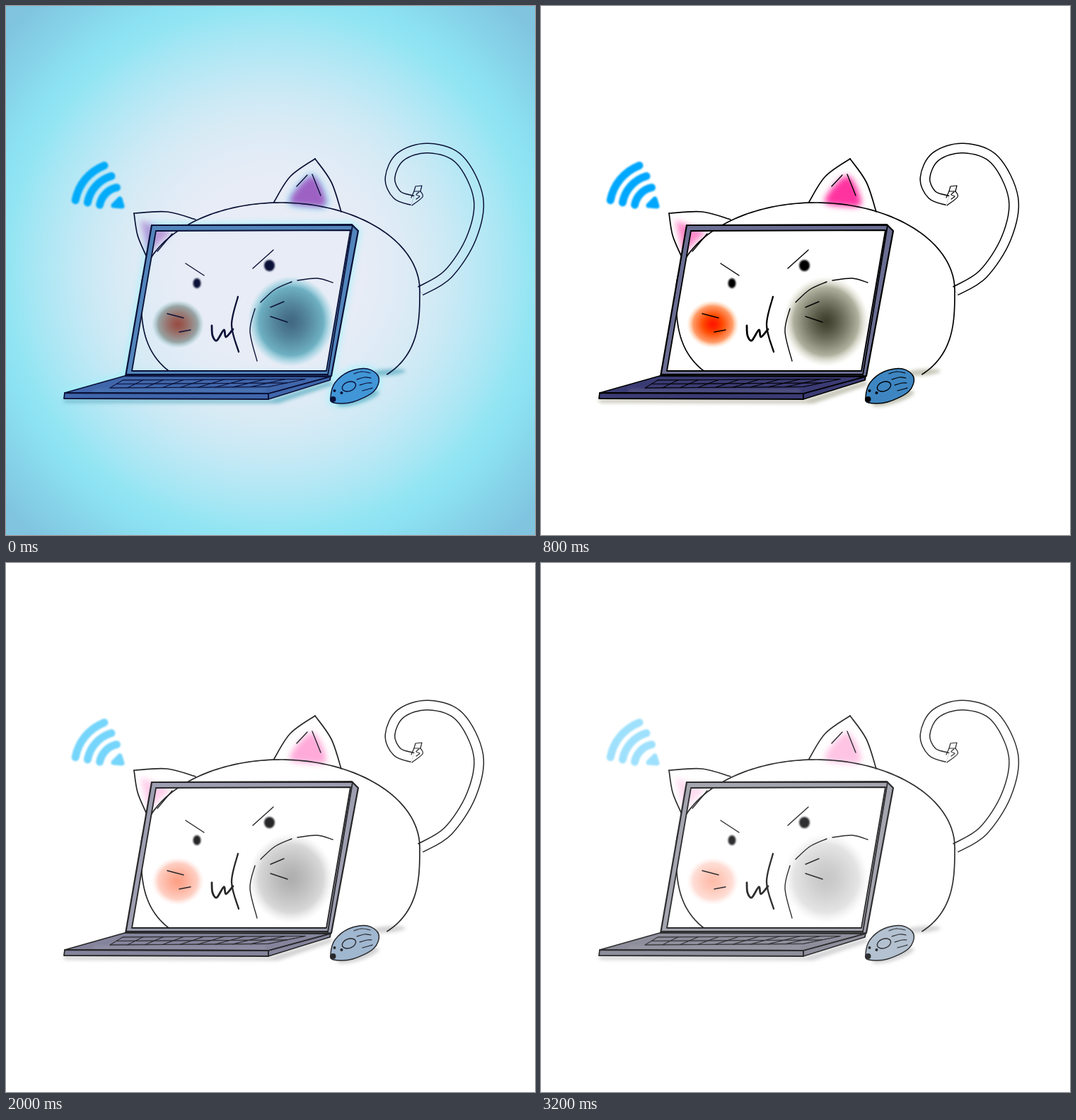
An HTML page with a canvas for the animation above (3.6 s loop, 748x748 px).

```html
<!DOCTYPE html>
<html lang="en">
<head>
<meta charset="utf-8">
<title>Cat in a laptop</title>
<style>
html, body { margin: 0; width: 100%; height: 100%; overflow: hidden; background: #fff; }
canvas { display: block; width: 748px; height: 748px; }
</style>
</head>
<body>
<canvas id="stage" width="748" height="748"></canvas>
<script>
const ctx = document.getElementById('stage').getContext('2d');
const STEP = 400, STEPS = 9, TAU = Math.PI * 2;

// Colours as drawn; each step then tones them by one rule
const WHITE = [255, 255, 255];
const INK = [18, 18, 20];
const WIFI = [6, 178, 248];
const PINK = [255, 94, 182];
const BLUSH = [252, 80, 34];
const GREY = [108, 108, 108];
const FRAME = [137, 139, 176];
const KEYS = [106, 106, 156];
const MOUSE = [108, 156, 208];
const SHADOW = [194, 194, 196];
const SOLID = [FRAME, KEYS, MOUSE];

const mix = (a, b, t) => a.map((v, i) => v + (b[i] - v) * t);
const looks = [
  ([r, g, b]) => [r * .6, g * .96, b * .85 + 38],
  ([r, g, b]) => [r * .865, g * .87, b * .91],
  ([r, g, b]) => [r, g, b].map((v, i) => (v - 160) * 1.5 + 140 - (i === 2 ? 18 : 0))
];

function faded(c, step) {
  const k = 1 - Math.exp(-(step - 3) / 1.7);
  if (SOLID.includes(c)) return mix(c, c.map(() => Math.max(...c)), k * .75);
  return mix(c, WHITE, k * (c === INK ? .13 : c === SHADOW ? .25 : .65));
}

let step = 0, page;
const tone = c => step < 3 ? looks[step](c) : faded(c, step);
const css = (c, a = 1) => `rgba(${c.map(v => Math.round(Math.max(0, Math.min(255, v))))},${a})`;
const paint = c => css(tone(c));

function makePage() {
  if (step > 0) return paint(WHITE);
  const centre = [232, 236, 246], rim = [141, 228, 243], corner = [125, 189, 219];
  const g = ctx.createRadialGradient(374, 374, 0, 374, 374, 529);
  for (let r = 0; r <= 1; r += .05) {
    const t = Math.max(0, Math.min(1, (r - .2) / .52));
    g.addColorStop(r, css(mix(mix(centre, rim, t ** 1.8), corner, Math.max(0, (r - .74) / .26))));
  }
  return g;
}

const points = text => text.split(' ').map(p => p.split(',').map(Number));

// Smooth path through the given points
function curve(text, closed) {
  const p = points(text), n = p.length, path = new Path2D();
  const at = i => closed ? p[(i + n) % n] : p[Math.max(0, Math.min(n - 1, i))];
  path.moveTo(...p[0]);
  for (let i = 0; i < (closed ? n : n - 1); i++) {
    const [a, b, c, d] = [at(i - 1), at(i), at(i + 1), at(i + 2)];
    path.bezierCurveTo(b[0] + (c[0] - a[0]) / 6, b[1] + (c[1] - a[1]) / 6,
      c[0] - (d[0] - b[0]) / 6, c[1] - (d[1] - b[1]) / 6, ...c);
  }
  return path;
}

function poly(text) {
  const path = new Path2D();
  points(text).forEach(p => path.lineTo(...p));
  path.closePath();
  return path;
}

function oval(x, y, rx, ry, turn = 0) {
  const path = new Path2D();
  path.ellipse(x, y, rx, ry, turn, 0, TAU);
  return path;
}

function stroke(path, width = 1.6, style = paint(INK)) {
  ctx.strokeStyle = style;
  ctx.lineWidth = width;
  ctx.stroke(path);
}

function fill(path, style) {
  ctx.fillStyle = style;
  ctx.fill(path);
}

function soft(blur, alpha, draw) {
  ctx.save();
  ctx.filter = `blur(${blur}px)`;
  ctx.globalAlpha = alpha;
  draw();
  ctx.restore();
}

const sketch = (width, ...texts) => texts.forEach(t => stroke(curve(t), width));

// Airbrushed spot: pales outwards, then dissolves
function spot(x, y, rx, ry, color) {
  ctx.save();
  ctx.translate(x, y);
  ctx.scale(rx, ry);
  const g = ctx.createRadialGradient(0, 0, 0, 0, 0, 1);
  const base = step < 3 ? color : faded(color, step);
  for (let t = 0; t <= 1; t += .125) {
    const c = mix(base, WHITE, .75 * t ** 1.3);
    g.addColorStop(t, css(step < 3 ? looks[step](c) : c, Math.min(1, (1 - t) * 4)));
  }
  fill(oval(0, 0, 1, 1), g);
  ctx.restore();
}

// Round on top, squarer below
function bodyPath() {
  const path = new Path2D();
  for (let a = 2.38; a < TAU + .84; a += .03) {
    const low = Math.sin(a) > 0, e = low ? 2 / 3 : 1;
    const bend = v => Math.sign(v) * Math.abs(v) ** e;
    path.lineTo(388 + 197 * bend(Math.cos(a)), 402 + (low ? 145 : 124) * bend(Math.sin(a)));
  }
  return path;
}

const body = bodyPath();
const tail = curve('586,403 625,379 658,328 668,272 641,217 597,201 558,213 543,243 553,267 575,275');
const rightEar = curve('433,240 401,275 428,283 453,279', true);
const leftEar = poly('190,303 234,320 218,334 201,350');
const outer = poly('206,310 489,309 498,318 460,523 169,524');
const inner = poly('212,318 487,317 453,516 178,516');
const bezel = new Path2D(outer);
bezel.addPath(inner);
const deck = poly('168,523 459,524 371,548 83,547');
const front = poly('83,547 371,548 371,556 82,555');
const side = poly('371,548 459,524 458,529 371,556');
const shade = poly('80,556 372,557 459,530 462,536 385,562 84,561');
const mouse = curve('459,553 465,533 485,517 511,513 527,525 520,545 490,560 463,561', true);

function drawWifi() {
  soft(1, 1, () => {
    for (let i = 0; i < 3; i++) {
      const arc = new Path2D();
      arc.arc(163, 287, 31 + 17.5 * i, 3.33, 4.5 - .08 * i);
      stroke(arc, 11, paint(WIFI));
    }
    const dot = poly('152,282 161,273 164,283');
    fill(dot, paint(WIFI));
    stroke(dot, 7, paint(WIFI));
  });
}

function drawTail() {
  ctx.lineCap = 'butt';
  stroke(tail, 15);
  stroke(tail, 12, page);
  ctx.lineCap = 'round';
  stroke(poly('579,255 588,254 586,262 577,262'), 1.2);
  sketch(1.2, '577,262 573,271', '586,262 589,270 574,282', '584,263 580,267 585,269 580,273');
}

function drawCat() {
  soft(4, .95, () => fill(rightEar, paint(PINK)));
  soft(4, .55, () => fill(leftEar, paint(PINK)));
  stroke(body, 1.7);
  sketch(1.7, '379,277 402,241 437,216', '437,216 460,249 474,291',
    '268,302 228,291 181,293', '181,293 186,324 198,353');
  sketch(1.4, '411,255 426,239', '433,238 445,268', '214,347 235,322');
}

function drawFace() {
  spot(243, 450, 37, 34, BLUSH);
  ctx.save();
  ctx.clip(inner);
  spot(403, 446, 61, 64, GREY);
  ctx.restore();
  sketch(1.4, '254,364 280,381', '378,345 349,371', '228,435 251,441', '245,461 261,458',
    '374,426 393,418', '374,439 398,447',
    '462,391 440,385 412,388', '404,390 380,401 360,419', '352,428 345,460 355,502');
  sketch(2.8, '291,452 292,466 298,473 308,458 311,468 321,457');
  sketch(2.3, '328,411 319,451 329,489');
  soft(1, 1, () => {
    fill(oval(270, 392, 5.5, 7), paint(INK));
    fill(oval(372.5, 367, 7.5, 8), paint(INK));
  });
}

function drawKeys() {
  const at = (t, v) => [165 + 258 * t - v * (18 + 34 * t), 529 - 1.5 * t + v * 11];
  const line = (a, b) => stroke(poly(`${a} ${b}`), .8);
  for (let r = 0; r <= 2; r++) line(at(0, r / 2), at(1, r / 2));
  for (let i = 0; i <= 9; i++) line(at(i / 9, 0), at(i / 9, 1));
}

function drawLaptop() {
  ctx.fillStyle = paint(FRAME);
  ctx.fill(bezel, 'evenodd');
  stroke(outer, 2.2);
  stroke(inner, 1.8);
  sketch(1.8, '206,310 490,310', '490,310 455,522', '170,521 455,521');
  [deck, front, side].forEach(p => fill(p, paint(KEYS)));
  soft(2, .6, () => stroke(curve('125,544 365,544'), 4, paint(FRAME)));
  drawKeys();
  [deck, front, side].forEach(p => stroke(p, 1.8));
}

function drawMouse() {
  fill(mouse, paint(MOUSE));
  stroke(mouse, 1.4);
  for (let i = 0; i < 4; i++) {
    const x = 492 + 4 * i, y = 520 + 8 * i;
    sketch(1.2, `${x},${y} ${x + 11},${y - 3} ${x + 23 - 3 * i},${y - 1 - i}`);
  }
  stroke(oval(485, 538, 10, 6.5, -.35), 1.4);
  [[464.5, 544, 2], [474.5, 547, 2], [462.5, 556, 4]].forEach(([x, y, r]) => fill(oval(x, y, r, r), paint(INK)));
}

function draw() {
  page = makePage();
  ctx.lineCap = ctx.lineJoin = 'round';
  ctx.fillStyle = page;
  ctx.fillRect(0, 0, 748, 748);
  soft(4, .75, () => [outer, deck, mouse, rightEar].forEach(p => stroke(p, 7, paint(WHITE))));
  soft(2.5, .9, () => {
    fill(shade, paint(SHADOW));
    fill(oval(540, 518, 25, 4.5, -.08), paint(SHADOW));
    fill(oval(498, 555, 31, 7, -.3), paint(SHADOW));
  });
  drawWifi();
  drawTail();
  drawCat();
  drawFace();
  drawLaptop();
  drawMouse();
}

let shown = -1;
function tick() {
  step = Math.floor(performance.now() / STEP) % STEPS;
  if (step !== shown) {
    shown = step;
    draw();
  }
  requestAnimationFrame(tick);
}
tick();
</script>
</body>
</html>
```
